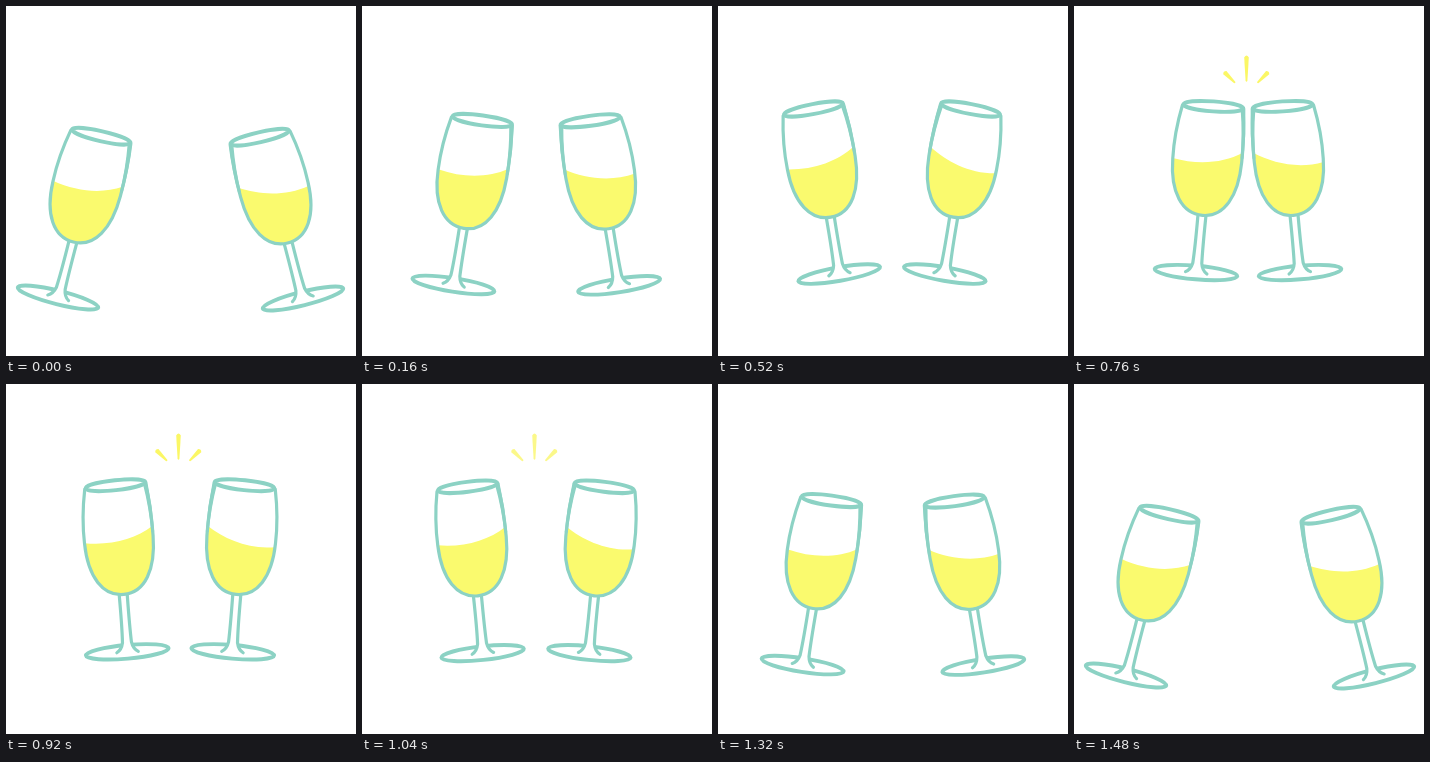
Animation of 350x350 px, one loop 1800 ms. Source, as an HTML page:

```html
<!DOCTYPE html>
<html lang="en">
<head>
<meta charset="utf-8">
<title>Cheers</title>
<style>
  html, body { margin: 0; height: 100%; overflow: hidden; background: #fff; }
  svg { display: block; width: 100vw; height: 100vh; }
  .line { fill: none; stroke: #8cd2c4; stroke-width: 3.2; stroke-linecap: round; stroke-linejoin: round; }
  .thick { stroke-width: 3.9; }
  .wall { fill: #8cd2c4; }
  .stem { fill: #fff; }
  .wine { fill: #fafa6e; }
  .ray { fill: #fbf765; }
</style>
</head>
<body>
<svg viewBox="0 0 350 350">
  <g id="left"></g>
  <g id="right"></g>
  <g id="spark"></g>
</svg>
<script>
  const LOOP = 1800, STEP = 40;
  const [left, right, spark] = ["left", "right", "spark"].map(id => document.getElementById(id));

  // A glass whose foot is centred on the origin; level is the wine height at the outer wall.
  const glass = level => `<g transform="translate(-120 -269.5)">
    <ellipse class="line thick" cx="120" cy="269.5" rx="41.5" ry="6.8"/>
    <path class="stem" d="M117 213Q117 245 116 260Q114.5 267 109 269.5L131 270Q126 267 125 260Q124.5 245 125 213Z"/>
    <path class="line" d="M117 213Q117 245 116 260Q114.5 267 109.5 269.5M125 213Q124.5 245 125 260Q126 267 131 270"/>
    <path class="wine" d="M87 ${level}C113 ${level + 5} 138 158 156 146.5C156 190 143 212 121.5 212C101 212 87.5 192 87 ${level}Z"/>
    <path class="line" d="M92 104C88.5 121 86.5 140 87 158C87.5 192 101 212 121.5 212C143 212 155.5 190 156 156C156.5 135 155 118 153 103"/>
    <path class="wall" d="M150.5 104L155 102Q158 127 157.5 152L154.5 152Q154.5 128 150.5 104Z"/>
    <ellipse class="line thick" cx="123" cy="102.5" rx="30" ry="5" transform="rotate(-1 123 102.5)"/>
  </g>`;

  const ray = (x, y, angle, length) =>
    `<path class="ray" transform="translate(${x} ${y}) rotate(${angle}) scale(1 ${length})"
      d="M-2.3 1.5Q0 -2.5 2.3 1.5L.9 25Q0 26.5 -.9 25Z"/>`;

  left.innerHTML = glass(157.5);
  right.innerHTML = glass(161.5);
  spark.innerHTML = ray(172.5, 50, 0, 1) + ray(150.2, 66, -45, 0.6) + ray(194.3, 66, 45, 0.6);

  // Progress from 0 to 1 between two times, easing in and out.
  function ease(t, from, to) {
    const u = Math.min(1, Math.max(0, (t - from) / (to - from)));
    return u * u * (3 - 2 * u);
  }

  function draw(t) {
    const away = 1 - ease(t, 0, 290) + ease(t, 1150, 1480);
    const lift = ease(t, 290, 740) - ease(t, 740, 1150);
    // Lean back, clink, rebound, then swing out again.
    const tilt = 14 - 24 * ease(t, 0, 540) + 15.2 * ease(t, 540, 740)
      - 12.2 * ease(t, 740, 980) + 21 * ease(t, 980, 1480);
    const x = 120.3 + 1.7 * lift - 68.3 * away;
    const y = 269.7 - 3.2 * lift + 21.8 * away;
    const mirrored = 348 - x + away * (1 + t / 500);

    left.setAttribute("transform", `translate(${x} ${y}) rotate(${tilt})`);
    right.setAttribute("transform", `translate(${mirrored} ${y + away}) scale(-1 1) rotate(${tilt})`);
    spark.setAttribute("opacity", ease(t, 640, 740) - ease(t, 960, 1210));
  }

  const start = performance.now();
  function tick() {
    const t = (performance.now() - start) % LOOP;
    draw(Math.floor(t / STEP) * STEP);
    requestAnimationFrame(tick);
  }
  tick();
</script>
</body>
</html>
```
